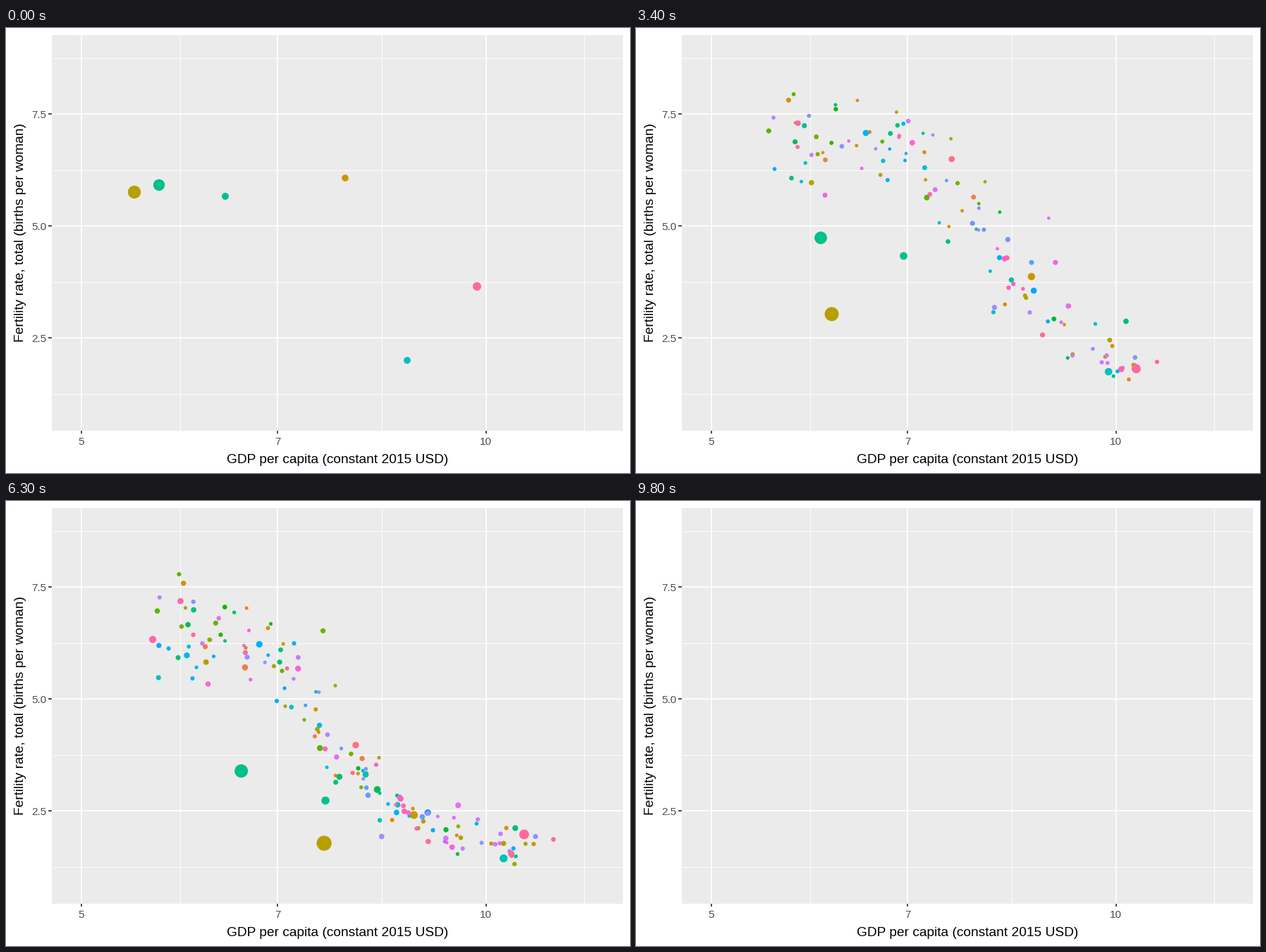
A matplotlib script for the animation above (10000 ms loop, 885x632 px).

```python
import matplotlib.pyplot as plt
import numpy as np
from matplotlib.animation import FuncAnimation
from matplotlib.patches import Rectangle

W, H, DPI = 885, 632, 100
FRAMES, LAST = 100, 97          # the panel is empty after LAST
COUNT = 156                     # small bubbles
PT = 72 / DPI
LEFT, RIGHT, TOP, BOTTOM = 65, 875, 9.5, 571.5
rng = np.random.default_rng(15)

plt.rcParams["font.family"] = "Liberation Sans"


def hue_color(f):
    """Evenly spaced HCL hue (chroma 100, luminance 65) as RGB."""
    h, lum = np.radians(15 + 360 * f), 65
    u = 100 * np.cos(h) / (13 * lum) + 0.1978
    v = 100 * np.sin(h) / (13 * lum) + 0.4683
    y = ((lum + 16) / 116) ** 3
    x = 9 * y * u / (4 * v)
    z = -x / 3 - 5 * y + 3 * y / v
    rgb = np.array([3.2405 * x - 1.5371 * y - 0.4985 * z,
                    -0.9693 * x + 1.8760 * y + 0.0416 * z,
                    0.0556 * x - 0.2040 * y + 1.0572 * z]).clip(0, 1)
    return np.where(rgb > 0.0031308, 1.055 * rgb ** (1 / 2.4) - 0.055, 12.92 * rgb)


# The six largest bubbles: hue, radius, positions at KEYS
KEYS = (0, 26, 54, 83)
GIANTS = [
    (0.167, 9.2, [(182, 233), (229, 376), (399, 482), (567, 495)]),
    (0.415, 8.2, [(217, 223), (246, 274), (302, 358), (404, 440)]),
    (0.945, 6.0, [(668, 367), (702, 489), (728, 471), (750, 479)]),
    (0.425, 5.0, [(311, 239), (357, 286), (436, 418), (491, 442)]),
    (0.125, 4.8, [(481, 213), (558, 323), (568, 428), (602, 486)]),
    (0.485, 4.9, [(569, 472), (657, 481), (703, 506), (712, 511)]),
]


def giant_positions(k):
    """Straight moves between key points, slowing after the last one."""
    out = []
    for _, _, pts in GIANTS:
        a, b = np.array(pts[-2]), np.array(pts[-1])
        end = b + 0.62 * (b - a) * (LAST - KEYS[-1]) / (KEYS[-1] - KEYS[-2])
        times, path = KEYS + (LAST,), np.vstack([pts, end])
        out.append([np.interp(k, times, path[:, i]) for i in (0, 1)])
    return np.array(out)


# Each small bubble has a wealth from -1 to 1 and a lag behind the common trend
wealth = 2 * rng.beta(1.6, 1.6, COUNT) - 1
x_start = 420 + 270 * wealth
x_end = 520 + 285 * wealth + rng.normal(0, 30, COUNT)
tail = np.minimum(20 * rng.pareto(1.3, COUNT), 230)
lag = tail + rng.normal(-20, 30, COUNT)
offset = rng.normal(0, 1, COUNT).clip(-2.2, 2.2)
wobble = rng.uniform(1, 5, COUNT)
phase = rng.uniform(0, 2 * np.pi, (3, COUNT))


def small_positions(k):
    """Incomes grow; fertility falls along a logistic curve that moves left."""
    t = k / LAST
    x = x_start + (x_end - x_start) * t ** (1.2 - 0.6 * wealth)
    x += wobble * (np.sin(k / 5 + phase[0]) + 0.5 * np.sin(k / 2.1 + phase[1]))
    center = 540 - 218 * t ** 2 + lag * (1 - t)
    fall = 1 / (1 + np.exp((center - x) / (25 + 50 * np.sqrt(t))))
    floor = 492 - 50 * np.exp(-k / 12)
    y = 160 + (floor - 160) * fall + offset * (38 - 20 * fall)
    return np.column_stack([x, y + 2 * np.sin(k / 6 + phase[2])])


hues = np.append([g[0] for g in GIANTS], rng.random(COUNT))
radii = np.append([g[1] for g in GIANTS],
                  (2.7 * np.exp(rng.normal(0, 0.2, COUNT))).clip(2.2, 4.4))
entries = np.append(np.zeros(len(GIANTS)),
                    np.maximum(rng.uniform(-60, 60, COUNT), tail / 8))
order = np.argsort(hues)
colors = np.array([hue_color(h) for h in hues])

fig = plt.figure(figsize=(W / DPI, H / DPI), dpi=DPI, facecolor="white")
ax = fig.add_axes([0, 0, 1, 1])
ax.set_xlim(0, W)
ax.set_ylim(H, 0)
ax.axis("off")


def line(xs, ys, width, color="white"):
    ax.plot(xs, ys, color=color, lw=width * PT, solid_capstyle="butt", zorder=1)


def label(x, y, text, px, color, **kw):
    ax.text(x, y, text, fontsize=px * PT, color=color, va="baseline",
            rotation_mode="anchor", **kw)


def x_pos(v):
    return 106.5 + 574 * np.log2(v / 5)


def y_pos(v):
    return 599.2 - 63.6 * v


def draw_panel():
    ax.add_patch(Rectangle((LEFT, TOP), RIGHT - LEFT, BOTTOM - TOP,
                           fc="#EBEBEB", lw=0, zorder=0))
    for x in (246.5, 532.5, 819.5):
        line((x, x), (TOP, BOTTOM), 0.9)
    for v in np.arange(1.25, 9, 2.5):
        line((LEFT, RIGHT), (y_pos(v), y_pos(v)), 0.9)
    for v in (5, 7, 10):
        x = x_pos(v)
        line((x, x), (TOP, BOTTOM), 1.7)
        line((x, x), (BOTTOM, BOTTOM + 4.8), 1.7, "#333333")
        label(x, 592.5, str(v), 15.3, "#4D4D4D", ha="center")
    for v in (2.5, 5.0, 7.5):
        y = y_pos(v)
        line((LEFT, RIGHT), (y, y), 1.7)
        line((LEFT - 4.8, LEFT), (y, y), 1.7, "#333333")
        label(57, y + 6, f"{v:.1f}", 15.3, "#4D4D4D", ha="right")
    label(470.3, 618.3, "GDP per capita (constant 2015 USD)", 19.1, "black", ha="center")
    label(25.5, 290.5, "Fertility rate, total (births per woman)", 19.1, "black",
          ha="center", rotation=90)


draw_panel()
dots = ax.scatter([], [], linewidths=0, zorder=3)


def update(k):
    shown = order[(entries[order] <= k) & (k <= LAST)]
    xy = np.vstack([giant_positions(k), small_positions(k)])
    dots.set_offsets(xy[shown])
    dots.set_sizes((2 * PT * radii[shown] * (1 + 0.0025 * k)) ** 2)
    dots.set_facecolors(colors[shown])
    return (dots,)


anim = FuncAnimation(fig, update, frames=FRAMES, interval=100,
                     repeat=True, repeat_delay=0, blit=False)
plt.show()
```
